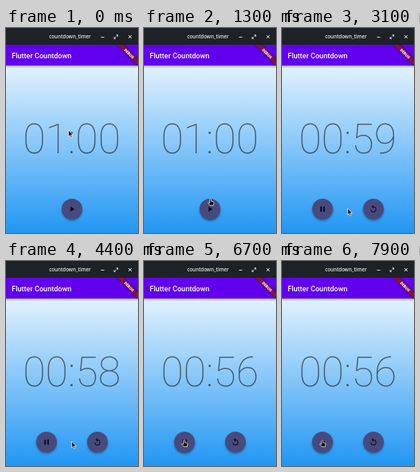
Write an HTML page that moves like this. It is 166 px wide and 257 px high and loops after 8 s.

```html
<!DOCTYPE html>
<html lang="en">
<head>
<meta charset="utf-8">
<title>Countdown</title>
<style>
  html, body { margin: 0; width: 100%; height: 100%; overflow: hidden; background: #2196f3; }
  svg { display: block; width: 166px; height: 257px; }
  text { font-family: Roboto, "Open Sans", sans-serif; }
  .window { font: 600 6.2px "Open Sans", "Noto Sans", sans-serif; fill: #e4e6e8; }
  .title { font-size: 9.1px; font-weight: 500; fill: #fff; }
  .digits { font-size: 52px; font-weight: 100; fill: #000; fill-opacity: .56; }
  .banner { font-size: 4.7px; font-weight: 900; fill: #fff; }
</style>
</head>
<body>
<svg viewBox="0 0 166 257">
  <defs>
    <linearGradient id="sky" x1="0" y1="0" x2="0" y2="1">
      <stop offset="0" stop-color="#e3f2fd"/>
      <stop offset="1" stop-color="#2196f3"/>
    </linearGradient>
    <filter id="soft" x="-50%" y="-50%" width="200%" height="200%">
      <feGaussianBlur stdDeviation="1.4"/>
    </filter>
    <clipPath id="bar"><rect y="21" width="166" height="236"/></clipPath>
    <clipPath id="disc"><circle r="13"/></clipPath>
    <path id="play" d="M8 5v14l11-7z"/>
    <path id="pause" d="M6 19h4V5H6zM14 5v14h4V5z"/>
    <path id="replay" d="M12 5V1L7 6l5 5V7c3.31 0 6 2.69 6 6s-2.69 6-6 6-6-2.69-6-6H4c0 4.42 3.58 8 8 8s8-3.58 8-8-3.58-8-8-8z"/>
  </defs>

  <rect y="47" width="166" height="210" fill="url(#sky)"/>
  <g clip-path="url(#bar)">
    <rect x="-4" y="23" width="174" height="25" filter="url(#soft)" opacity=".4"/>
    <rect y="21" width="166" height="26" fill="#6200ee"/>
    <text class="title" x="7.2" y="37.6">Flutter Countdown</text>
    <g transform="translate(166 21) rotate(45)">
      <rect x="-19" y="13" width="38" height="5.6" filter="url(#soft)" opacity=".5"/>
      <rect x="-19" y="13" width="38" height="5.6" fill="#85123e"/>
      <text class="banner" y="17.5" text-anchor="middle">DEBUG</text>
    </g>
  </g>

  <rect width="166" height="21" fill="#1e2226"/>
  <text class="window" x="80.5" y="13" text-anchor="middle">countdown_timer</text>
  <g fill="none" stroke="#e4e6e8" stroke-width=".9">
    <path d="M119.5 11.5h4M154 9l4 4m0-4l-4 4"/>
    <path d="M138.6 8.8h2v2m0-2l-1.9 1.9M138 13.2h-2v-2m0 2l1.9-1.9"/>
  </g>

  <text id="digits" class="digits" x="82.7" y="156.7" text-anchor="middle">01:00</text>
  <g id="buttons"></g>
  <g id="cursor" stroke="#fff" stroke-linejoin="round">
    <path id="arrow" d="M0 0V8.2L1.9 6.5L3.2 9.4L4.6 8.8L3.4 6H5.8Z" fill="#111" stroke-width=".7"/>
    <path id="hand" d="M-.9.7Q0-.5.9.7V3.2L3.6 3.8Q4.6 4.1 4.4 5.2L3.8 8.4H-.4L-2.8 5.6Q-3 4.4-1.9 4.7L-.9 5.4Z" fill="#111" stroke-width=".7"/>
  </g>
</svg>
<script>
const LOOP = 8000, STEP = 100;
const START = 1900, PAUSE = 6900;
const $ = id => document.getElementById(id);
const NS = "http://www.w3.org/2000/svg";

// time, x, y of the pointer's hot spot
const PATH = [
  [0, 78.5, 128], [300, 78.5, 128], [1100, 83.5, 214], [1300, 83.5, 214],
  [1700, 82.5, 226], [5700, 82.5, 226], [6400, 50.5, 223.5], [6800, 50.5, 224.5]
];

const clamp = v => Math.min(1, Math.max(0, v));
const ease = v => v * v * (3 - 2 * v);

function add(parent, tag, attrs) {
  const el = document.createElementNS(NS, tag);
  for (const k in attrs) el.setAttribute(k, attrs[k]);
  return parent.appendChild(el);
}

function makeButton(x) {
  const root = add($("buttons"), "g", { transform: `translate(${x} 227)` });
  const shadow = add(root, "circle", { cy: 1.7, r: 12.8, filter: "url(#soft)" });
  add(root, "circle", { r: 13, fill: "#484a7e" });
  const clip = add(root, "g", { "clip-path": "url(#disc)" });
  const ripple = add(clip, "circle", { fill: "#fff" });
  const icon = add(root, "use", { transform: "scale(.464) translate(-12 -12)", fill: "#0c0c14" });
  return { root, shadow, ripple, icon, x };
}

const left = makeButton(51), mid = makeButton(83), right = makeButton(115);

function pointer(t) {
  let i = PATH.length - 1;
  while (i && PATH[i][0] > t) i--;
  const a = PATH[i], b = PATH[i + 1] || a;
  const p = b === a ? 0 : ease((t - a[0]) / (b[0] - a[0]));
  return [a[1] + (b[1] - a[1]) * p, a[2] + (b[2] - a[2]) * p];
}

function setButton(b, shown, icon, hover, press, t) {
  b.root.style.display = shown ? "" : "none";
  b.icon.setAttribute("href", "#" + icon);
  b.shadow.setAttribute("opacity", hover ? .5 : .38);
  const grow = clamp((t - press) / 300);
  const fade = 1 - clamp((t - press - 200) / 300);
  b.ripple.setAttribute("r", 4 + 9 * grow);
  b.ripple.setAttribute("opacity", t > press ? .2 * fade : 0);
}

function draw(t) {
  const running = t >= START;
  const [x, y] = pointer(t);
  const over = b => Math.hypot(x - b.x, y - 227) < 13.4;
  const ticks = running ? Math.floor((Math.min(t, PAUSE - STEP) - START) / 1000) : 0;
  $("digits").textContent = ticks ? "00:" + (60 - ticks) : "01:00";

  setButton(mid, !running, "play", over(mid), 1600, t);
  setButton(left, running, t < PAUSE ? "pause" : "play", over(left), t < 3000 ? 1700 : 6700, t);
  setButton(right, running, "replay", false, LOOP, t);

  const hand = t < 2000 ? over(mid) : over(left);
  $("hand").style.display = hand ? "" : "none";
  $("arrow").style.display = hand ? "none" : "";
  $("cursor").setAttribute("transform", `translate(${x} ${y})`);
}

function frame() {
  const t = performance.now() % LOOP;
  draw(Math.floor(t / STEP) * STEP);
  requestAnimationFrame(frame);
}
frame();
</script>
</body>
</html>
```
